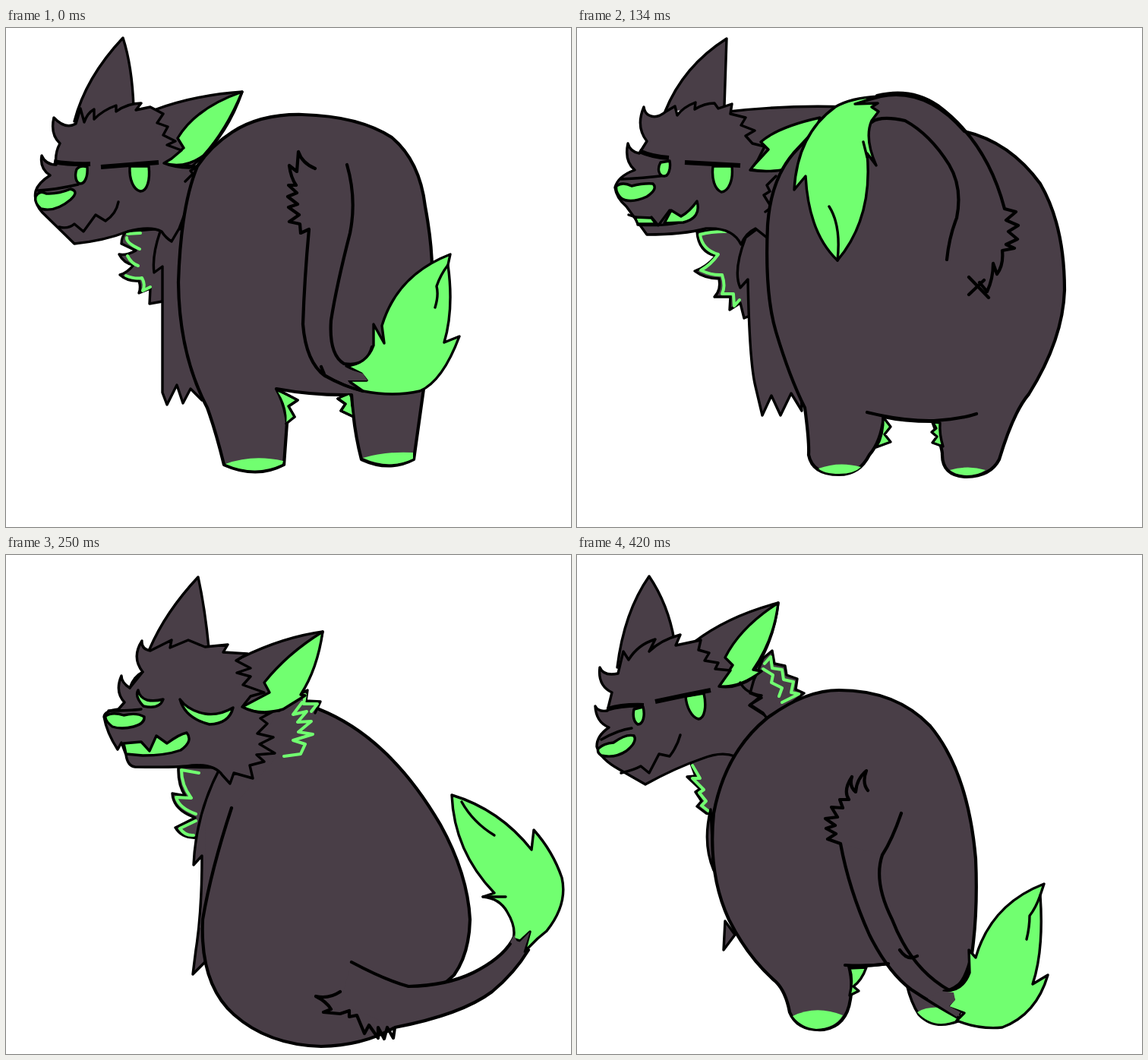
An HTML page without scripts that plays this animation: 744x657 px, repeating every 0.5 s.

```html
<!DOCTYPE html>
<html lang="en">
<head>
<meta charset="utf-8">
<title>Wolf turning</title>
<style>
html, body { margin: 0; width: 100%; height: 100%; overflow: hidden; background: #fff; }
svg { display: block; width: 100%; height: 100%; }
path { fill: #493e47; stroke: #000; stroke-width: 3.4; stroke-linejoin: round; stroke-linecap: round; }
.g { fill: #71ff70; }
.l { fill: none; }
.n { stroke: none; }
.t { fill: none; stroke: #71ff70; stroke-width: 4; }
.brow { fill: none; stroke-width: 6; stroke-linecap: butt; }
.body { stroke-width: 4.2; }
.pose { visibility: hidden; animation: short 500ms step-end infinite; }
.long { animation-name: long; }
@keyframes short { 0% { visibility: visible; } 16%, 100% { visibility: hidden; } }
@keyframes long { 0% { visibility: visible; } 18%, 100% { visibility: hidden; } }
</style>
</head>
<body>
<svg viewBox="0 0 744 657">

<g class="pose">
  <path d="M90 123Q105 65 154 13Q166 50 168 104"/>
  <path d="M158 268Q152 275 152 284L171 293Q158 300 149 298Q155 310 168 312Q160 322 150 325Q160 334 175 333Q178 342 175 349L190 343L189 363L206 360L230 262Z"/>
  <path class="t" d="M160 271L177 270M159 276Q158 283 176 291M160 300Q165 310 174 313M158 326Q170 331 179 329Q184 338 180 346L190 341"/>
  <path d="M203 268Q192 300 195 322L206 314V480L212 496L225 470L233 494L243 475L258 490L250 262Z"/>
  <path d="M195 108Q250 88 311 84Q290 145 245 182L208 178L180 140Z"/>
  <path class="g" d="M311 84Q250 105 226 145L234 158L208 178Q235 186 260 168Q290 135 311 84Z"/>
  <path d="M92 126Q78 134 63 118Q58 140 71 152Q64 165 66 180Q52 180 47 168Q44 185 58 194Q42 204 39 215Q36 230 48 243L90 284Q130 280 160 268Q190 260 205 268Q210 276 218 281L228 264L260 180L241 184Q222 184 208 178L218 172L231 161L212 154L223 149L207 141L213 130L199 125L207 113L190 104L171 108L178 99Q160 99 145 110V102Q128 108 116 120V107Q107 112 103 124L98 106Z"/>
  <path class="l" d="M252 182L243 188L246 192L236 202M42 214Q65 213 95 206M70 262Q82 265 90 258L102 268L118 246L131 254Q145 245 148 229"/>
  <path class="g" d="M39 222Q44 213 53 218Q68 219 85 212Q97 215 85 226Q65 243 46 238Q37 230 39 222ZM93 186Q98 180 107 183C108 195 104 205 98 205C92 204 90 195 93 186ZM163 182H188C190 200 186 215 177 215C168 213 162 200 163 182Z"/>
  <path class="brow" d="M63 176Q85 180 111 179M125 183L201 177"/>
  <path class="g" d="M356 476L384 490L372 498L380 512L366 521ZM455 480L437 488L447 495L441 504L458 512Z"/>
  <path class="body" d="M298 137Q335 113 390 114Q465 116 508 144Q545 175 552 235Q564 300 560 340L550 475L537 568Q505 585 468 568Q458 530 455 483Q405 484 356 475Q367 495 370 520L366 575Q330 594 287 575Q276 530 265 500Q228 430 227 335Q230 235 252 182Q270 155 298 137Z"/>
  <path class="g n" d="M358 479Q372 500 369 521L380 512L374 498L382 490ZM452 483L440 488L449 495L443 503L456 510Z"/>
  <path class="g n" d="M289 574Q325 561 365 570L364 574Q328 591 289 574ZM470 566Q500 557 536 559V567Q505 582 470 566Z"/>
  <path class="l" d="M356 475L384 490L372 498L380 512L369 521M437 488L447 495L441 504L456 511"/>
  <path class="l body" d="M407 185Q390 178 385 163L383 189L373 181Q375 197 382 207L372 207L383 217L371 222L384 232L372 236L386 246L373 255L387 258L388 270L399 265Q393 330 391 390Q395 440 420 458Q445 472 470 478M415 446L420 458M449 180Q462 225 453 270Q435 340 428 385Q425 430 445 442Q475 447 482 420"/>
  <path class="g" d="M585 298Q515 325 495 392L498 415L484 390L484 418Q475 443 448 445L468 455L475 464H450L470 478Q510 486 545 478Q575 465 597 406L577 414Q590 370 582 312Z"/>
  <path class="n" d="M444 447L470 455L476 464L450 464L455 472L420 456Z"/>
  <path class="l" d="M582 312Q572 325 567 340Q570 352 565 368M418 456Q445 472 470 478"/>
</g>

<g class="pose long" style="animation-delay:-420ms">
  <path d="M116 110Q140 50 197 14L194 104"/>
  <path d="M158 268Q160 295 183 300Q170 315 155 320Q168 330 187 330Q190 345 181 354L202 354L201 371L215 362L220 382L230 378L240 262Z"/>
  <path class="t" d="M196 268Q175 268 162 272Q165 292 186 298Q176 312 163 319Q178 326 191 325Q196 340 191 350L206 350L207 366L214 358"/>
  <path d="M222 276Q205 320 215 342L225 331Q227 440 235 472L244 510L256 484L268 510L282 481L296 504L290 260L238 264Z"/>
  <path d="M200 110Q280 101 355 104L300 160L228 186L205 150Z"/>
  <path class="g" d="M320 118Q265 130 242 150L252 160L228 186Q255 192 275 186L310 150Z"/>
  <path d="M117 110Q105 120 95 115Q89 112 88 104Q77 130 92 149L82 165Q70 163 67 152Q62 175 76 187Q54 195 50 210Q52 224 65 235L92 272Q140 272 170 264Q205 262 216 285Q222 270 235 264L255 280L270 187Q250 190 228 187L238 174L247 156L231 152L222 142L234 135L216 128L222 118L202 113L204 100L186 106L181 99Q168 99 155 107L156 98Q140 104 132 115L129 103Z"/>
  <path class="l" d="M262 195L250 207L254 215L246 220L256 236L248 242M58 199Q85 198 118 194M68 246L77 249M80 259Q130 262 150 250M98 249L107 260L122 240"/>
  <path class="g" d="M52 208Q60 202 72 208Q88 204 100 205Q107 212 92 222Q70 232 58 224Q50 215 52 208ZM76 249L98 250L104 258H80ZM115 257L124 240L137 248Q148 242 158 228Q164 250 140 256ZM110 177L122 175C124 186 120 195 115 195C108 195 105 186 110 177ZM179 182H204C206 200 200 215 190 216C181 212 177 198 179 182Z"/>
  <path class="brow" d="M82 162Q100 170 121 171M142 177L215 181"/>
  <path class="body" d="M285 165Q255 200 251 260Q247 350 262 400Q280 460 300 500Q306 545 305 562Q310 588 345 588Q372 588 385 562Q400 545 404 512Q430 518 468 518Q480 550 481 560Q480 590 513 591Q545 590 556 568Q575 505 595 482Q640 410 642 345Q642 260 610 205Q570 150 510 136Q460 78 400 90L340 106Z"/>
  <path class="g" d="M403 512L413 525L405 535L413 545L394 552Q404 535 403 512ZM468 518L478 520Q477 535 482 551L468 546L474 538L467 532L473 527Z"/>
  <path class="g n" d="M318 580Q345 570 374 578Q365 587 345 587Q325 587 318 580ZM491 582Q515 575 538 582Q528 589 513 589Q498 588 491 582Z"/>
  <path class="l body" d="M382 506Q430 518 470 517Q505 515 526 508M395 89Q440 78 475 102Q540 150 563 238L578 242L565 253L581 260L568 268L580 278L565 285L576 290L560 293Q562 312 553 324L548 310Q548 330 540 347L530 335M388 124Q400 115 432 122Q465 140 490 180Q508 210 500 250Q490 275 487 305M516 328L542 355M536 332L516 351"/>
  <path class="g" d="M397 90Q360 92 340 104Q290 140 286 213L301 195Q305 270 343 306Q390 250 382 165L394 181Q378 145 388 122L397 110L388 104L396 99L366 100Z"/>
  <path class="l" d="M343 306Q348 260 332 235M377 150L382 170"/>
</g>

<g class="pose" style="animation-delay:-330ms">
  <path d="M143 168Q145 95 172 51Q195 85 219 135"/>
  <path d="M206 308Q210 325 228 331Q220 342 213 347Q222 356 233 355L216 362Q230 367 241 364L237 374Q250 376 262 370L290 270L215 290Z"/>
  <path class="t" d="M212 313Q218 326 233 331L222 346Q230 353 240 353L226 361Q238 363 247 361L244 371L256 369M212 311Q230 312 241 309"/>
  <path d="M273 288Q252 325 253 347L265 342Q262 430 259 504L277 484L288 504L300 480L310 290Z"/>
  <path d="M330 190L344 166L355 155L358 172L374 167L383 183L425 215L330 290L290 300Z"/>
  <path class="t" d="M342 182L354 162L358 180L373 172L379 184L364 190L378 201L362 207L382 214L360 220L380 230L357 238M346 190L356 195"/>
  <path class="body" d="M411 216Q330 262 305 330Q287 390 296 445Q302 480 325 520Q340 560 342 595Q345 602 385 601Q420 601 426 594L437 543Q480 545 520 541L517 575L520 597L590 593Q625 540 635 480Q655 410 652 370L643 330L602 262Q560 215 500 195Q440 180 383 183"/>
  <path class="g" d="M437 543L455 548L443 560L453 565L434 576ZM520 541L508 545L512 556L503 562L518 572Z"/>
  <path class="g n" d="M348 598Q375 592 405 598L385 600ZM538 596Q558 591 575 595Z"/>
  <path class="l" d="M403 542Q440 545 480 545Q560 535 602 489"/>
  <path class="n" d="M592 190L612 192Q645 240 646 290Q645 360 630 385L585 405L560 360Q600 335 602 262Q604 220 592 190Z"/>
  <path class="l body" d="M523 392Q545 372 575 355Q600 335 602 262Q604 220 590 196M612 192Q645 240 646 290Q645 360 630 387L638 400L622 399L632 410L610 407L620 420L603 418L607 428L583 430L578 448L572 441L570 455L558 440L543 457Q545 440 555 430"/>
  <path class="g" d="M385 162Q402 157 415 142Q450 114 503 110Q480 108 467 98Q530 88 565 112Q595 135 603 168L608 160L612 195L600 178L596 196L588 194Q570 182 543 188L523 202Q524 190 534 178Q520 198 470 195Q430 190 401 178L411 172Z"/>
  <path class="l" d="M403 164Q430 160 455 146"/>
  <path d="M240 142Q300 110 373 94Q365 150 335 182L280 198L245 165Z"/>
  <path class="g" d="M373 94Q320 115 298 158L304 167L280 198Q310 203 336 184L331 178Q362 150 373 94Z"/>
  <path d="M146 170Q126 174 121 162Q118 185 136 200L128 222Q118 220 116 213Q110 235 125 248Q112 258 111 270Q120 288 135 290L148 306L153 297L158 311L173 321Q210 312 240 296Q270 282 305 291L313 299L320 285L331 288L325 268L333 270L322 258L340 250L326 241L340 232L323 225L330 213L318 210L332 190Q310 203 280 198L292 184L301 180L279 173L290 166L270 162L278 152L258 150L266 138L246 146L228 144L234 130L214 138L218 129Q200 135 188 150L190 140Q170 150 158 163L152 150Z"/>
  <path class="l" d="M125 262Q150 252 165 250M135 290Q145 292 153 297M133 200L128 222"/>
  <path class="g" d="M114 269Q122 262 135 264Q150 255 160 255Q169 260 155 275Q140 288 125 283Q112 276 114 269ZM153 297Q170 297 186 290L193 296L200 275L213 282Q222 272 219 261Q232 248 235 268Q232 285 205 297Q180 308 159 310ZM163 228L178 226C180 236 176 243 170 242C163 240 161 234 163 228ZM236 218L258 212C262 226 259 240 250 241C242 239 236 230 236 218Z"/>
  <path class="brow" d="M131 225Q165 220 198 224M200 220Q235 219 267 209"/>
</g>

<g class="pose" style="animation-delay:-250ms">
  <path d="M189 124Q210 75 253 29Q262 70 267 122"/>
  <path d="M227 279Q226 303 236 317L219 314Q220 332 240 342L249 346L223 359Q232 374 252 372L290 280Z"/>
  <path class="t" d="M254 287L231 283Q231 303 244 320L224 319Q228 333 250 341M250 350L229 360Q236 370 247 369"/>
  <path d="M282 280Q250 340 247 408L258 396Q258 470 250 520L246 552L262 536L310 290Z"/>
  <path class="n" d="M285 275L262 350Q265 410 255 490L300 560L420 400L415 203L380 180L310 200Z"/>
  <path class="body" d="M297 333Q270 415 259 480Q255 565 300 605Q345 645 415 647Q470 646 512 622L590 553Q610 525 611 480Q608 420 572 355Q505 240 412 203"/>
  <path class="n" d="M365 190L397 178L395 192L414 193L407 207L380 270L330 260Z"/>
  <path class="l" d="M377 187L397 178L395 192L414 193L407 208"/>
  <path class="t" d="M384 190L394 184L392 196L410 196L402 206M390 194L378 210L396 206L384 220L402 219L385 233L404 236L378 244L394 249L388 262L366 265"/>
  <path class="n" d="M455 536Q500 560 530 568Q580 567 615 550Q655 530 668 505L690 515Q670 550 640 575Q600 605 512 622L440 590Z"/>
  <path class="l body" d="M455 536Q500 560 530 568Q580 567 615 550Q655 530 668 505M440 575Q425 585 408 581Q422 588 428 598L418 602L440 604L452 600V608L462 606L472 630L478 619L490 636V622L498 637L502 622L510 636L512 622Q600 605 640 575Q670 550 688 520"/>
  <path class="g" d="M587 316Q590 390 643 445L628 450Q650 452 660 470Q672 490 668 505L677 508L690 496L683 522L700 505L712 495Q740 460 732 425Q720 390 695 362L692 388Q650 335 587 316Z"/>
  <path class="n" d="M664 510L669 500L674 512L690 496L681 524Z"/>
  <path class="l" d="M600 325Q615 352 643 369M628 450H658"/>
  <path d="M310 135Q365 108 417 101Q405 165 360 205L311 200L285 150Z"/>
  <path class="g" d="M417 101Q370 130 340 168L347 181L311 200Q335 212 365 203L394 185L388 184Q410 150 417 101Z"/>
  <path d="M190 126Q178 124 179 113Q165 135 180 154L163 175Q152 168 152 159Q143 180 156 194L148 203Q130 205 129 213Q133 235 147 256L152 247L158 263Q160 278 170 279Q230 280 245 277Q275 275 285 290L295 301L300 287L325 294L321 277L340 272L330 263L354 261L334 249L352 240L331 235L344 222L335 215L350 207Q330 210 311 200L322 186L340 181L312 171L322 160L304 155L322 149L303 139L318 130L286 128L292 118L262 121L240 112L216 122L218 112Z"/>
  <path class="l" d="M135 205Q165 205 178 203M180 154Q168 160 163 175"/>
  <path class="g" d="M131 212Q140 206 155 211Q172 207 182 213Q183 222 168 226Q152 230 140 226Q130 218 131 212ZM155 248L178 246L189 258L198 238L212 248Q228 236 238 234Q247 245 230 257Q210 264 180 264L158 262ZM174 178Q169 186 181 199Q202 204 207 190Q195 193 186 191Q176 188 174 178ZM229 190Q236 215 268 223Q294 222 299 201Q280 212 262 209Q240 205 229 190Z"/>
</g>

<g class="pose long" style="animation-delay:-170ms">
  <path d="M119 168Q110 105 143 56Q165 90 183 132"/>
  <path d="M290 160L299 132L309 126L312 144L326 146L329 157L345 159L344 172L354 173L350 195L290 220Z"/>
  <path class="t" d="M302 142L307 134L310 150L323 151L326 164L341 164L338 178L350 178L346 189L336 188M304 152L314 162L318 172L330 176L332 188"/>
  <path class="g" d="M201 308L192 325L202 330L208 352L230 310Z"/>
  <path class="n" d="M200 308L208 324L210 345L240 270Z"/>
  <path d="M207 136Q260 95 311 64Q312 120 295 160L250 180L215 155Z"/>
  <path class="g" d="M311 64Q268 100 253 142L262 152L249 179Q275 182 300 155L291 154Q310 125 311 64Z"/>
  <path d="M120 186Q102 190 97 181Q98 205 119 214L117 232Q108 240 100 234Q106 252 122 254Q106 268 110 284Q120 295 135 297L152 308L180 320L226 293L300 215L305 195L285 190L296 168Q275 182 249 179L258 164L240 156L234 147L222 146L228 134L208 137L186 136L189 125Q170 132 158 148L160 138Q142 148 130 168L123 158Z"/>
  <path class="l" d="M283 180Q292 192 306 194L290 203L300 212M118 262Q140 250 152 248M168 299Q180 300 190 293M119 214L117 228"/>
  <path class="g" d="M112 284Q122 272 135 272Q145 258 155 260Q160 268 148 282Q138 294 120 291Q110 289 112 284ZM154 308L170 299L178 301L168 311ZM190 294L192 276L204 284Q208 272 205 261Q215 240 220 262Q220 280 205 290ZM149 228L160 224C164 236 162 247 155 248C149 246 147 238 149 228ZM212 203L236 194C240 212 237 226 228 227C220 227 213 216 212 203Z"/>
  <path class="brow" d="M119 230Q135 224 162 223M174 215Q205 203 241 185"/>
  <path d="M245 574L290 624Q310 634 334 626L342 600"/>
  <path class="g n" d="M296 627Q310 624 327 627L310 629ZM342 601L352 601L346 607L340 606Z"/>
  <path class="body" d="M355 192Q415 188 465 235Q520 290 535 375Q545 440 537 500Q530 550 513 566L400 598Q290 600 240 572Q190 520 192 430Q195 350 235 270Q270 205 355 192Z"/>
  <path class="l body" d="M350 188H370"/>
  <path class="n" d="M436 500Q440 540 475 557Q505 570 545 562Q600 548 640 517L655 540Q630 570 590 592Q540 615 460 620L396 600L370 570Z"/>
  <path class="l body" d="M364 494Q359 530 366 563M355 560L378 568L385 578L365 574L374 584L389 585M434 490Q440 540 475 557Q505 570 545 562Q600 548 640 517M370 598L399 597Q400 605 412 608L411 624L424 614L431 632L436 618L446 634L449 618L455 633L460 620Q540 615 590 592Q630 570 652 545"/>
  <path class="g n" d="M459 620H470L462 624Z"/>
  <path class="g" d="M578 306Q575 400 620 454L603 453Q632 465 640 490L638 514L650 517L660 508L652 538L670 520L685 510Q722 470 714 430Q705 390 683 367L680 398Q640 345 578 306Z"/>
  <path class="l" d="M590 320Q610 350 630 369M603 453L635 458"/>
</g>

<g class="pose" style="animation-delay:-80ms">
  <path d="M53 148Q62 75 95 28Q120 65 128 112"/>
  <path d="M235 160L245 136L257 126L260 143L274 146L276 158L290 163L288 177L299 182L250 220L215 200Z"/>
  <path class="t" d="M247 143L255 134L257 149L270 151L272 164L285 167L282 181L292 183L270 194M245 150L258 158L256 168L270 175L266 186"/>
  <path d="M149 272L156 291L145 292L162 308L156 312L164 324L158 331L170 340L180 342L230 250L160 258Z"/>
  <path class="t" d="M152 277L162 294L152 294L167 309L161 313L170 324L164 330L173 337"/>
  <path d="M176 335Q165 380 180 415ZM195 482L193 520L208 500Z"/>
  <path d="M155 114Q200 80 265 63Q260 110 235 150L187 172L155 140Z"/>
  <path class="g" d="M265 63Q215 95 195 135L205 145L187 173Q215 175 243 153L232 151Q260 110 265 63Z"/>
  <path d="M54 156Q35 160 30 148Q27 172 46 181L40 205Q28 207 24 199Q25 220 42 227Q26 238 26 252Q30 268 55 282L90 302Q130 280 165 268Q190 258 208 265L250 215L245 208L228 197L243 188L228 182L234 160Q210 177 187 173L202 152L182 150L186 142L168 139L174 129L160 125L163 112L130 119L136 105Q110 112 95 127L103 111Q80 118 68 138L61 127Z"/>
  <path class="l" d="M215 168Q222 182 243 185L227 198L246 210M32 243Q55 230 72 228M58 287Q75 283 84 278L95 287L108 262L122 265Q132 252 136 237"/>
  <path class="g" d="M28 255Q35 248 48 247Q65 235 75 238Q80 246 65 258Q50 268 32 264Q26 260 28 255ZM75 203L87 200C90 212 87 223 80 223C75 220 73 212 75 203ZM143 186L167 182C171 200 168 215 160 216C151 214 144 200 143 186Z"/>
  <path class="brow" d="M40 203Q60 197 88 198M103 193Q140 185 176 178"/>
  <path d="M434 565Q440 590 450 605Q470 626 502 614L515 550Z"/>
  <path class="g n" d="M448 602Q460 594 485 596L501 612Q470 626 448 602Z"/>
  <path class="body" d="M250 215Q300 178 345 178Q420 178 465 225Q515 285 525 400Q528 470 520 525Q510 570 490 573L410 538Q380 542 358 541Q364 565 360 585Q355 620 325 625Q290 627 280 602Q275 575 262 562Q225 530 200 480Q172 420 180 340Q195 260 250 215Z"/>
  <path class="g" d="M359 544L381 543Q375 560 364 568L371 574L359 580Q364 560 359 544Z"/>
  <path class="g n" d="M284 607Q315 592 350 606Q340 623 315 624Q295 622 284 607Z"/>
  <path class="n" d="M347 380Q358 440 385 500Q410 550 440 572L505 610L490 573Q440 545 415 480L402 395Z"/>
  <path class="l body" d="M383 310Q375 300 381 284Q368 295 367 312Q358 305 362 292Q350 310 358 322H346L350 333L335 332L343 345L327 347L340 356L328 360L341 367L330 374L347 380Q358 440 385 500Q410 550 440 572Q470 592 505 611M427 340Q415 375 402 395Q390 430 415 480Q440 545 490 573Q510 565 517 545M353 540Q380 542 410 538M425 520Q435 535 448 528"/>
  <path class="g" d="M615 433Q545 460 525 530L516 520L517 550Q508 575 483 574L496 585L488 595L510 603L500 613Q530 625 560 622Q605 605 620 553L600 565Q615 520 610 448Z"/>
  <path class="n" d="M478 574L496 576L498 586L490 594L505 602L500 608L462 584Z"/>
  <path class="l" d="M610 448Q604 465 596 475Q596 490 592 506"/>
</g>

</svg>
</body>
</html>
```
